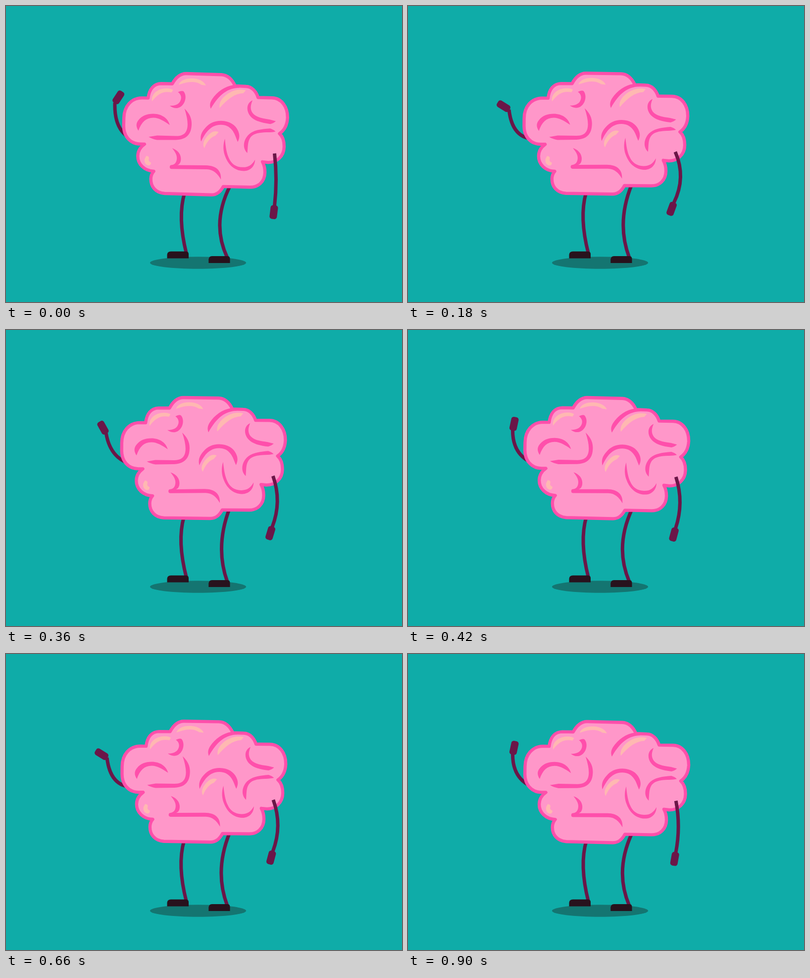
An HTML page that plays this animation: 800 by 600 pixels, repeating every 930 ms.

```html
<!DOCTYPE html>
<html lang="en">
<head>
<meta charset="utf-8">
<title>Waving brain</title>
<style>
  html, body { margin: 0; width: 100%; height: 100%; overflow: hidden; background: #0facA8; }
  svg { display: block; width: 100%; height: 100%; }
  .limb { fill: none; stroke: #6b1648; stroke-width: 7; }
  .hand { fill: #6b1648; }
  .shoe { fill: #28121d; }
  .skin { fill: #ff97c9; stroke: #ff4fab; stroke-width: 6.4; stroke-linejoin: round; }
  .fold { fill: #ff4fab; }
  .shine { fill: #ffb8b2; }
</style>
</head>
<body>
<svg viewBox="0 0 800 600">
  <ellipse cx="388" cy="520.5" rx="97" ry="12.3" fill="#147571"/>
  <path id="legL" class="limb"/>
  <path id="legR" class="limb"/>
  <path class="shoe" d="M325.5 511.5V504Q326 497.500 333 497.500H363Q369 497.500 369 503V511.500Z"/>
  <path class="shoe" d="M409.300 521V513.500Q410 507 416.500 507H447Q452.500 507 452.500 512.500V521Z"/>
  <path id="armL" class="limb"/>
  <rect id="handL" class="hand" x="-7.5" y="-14" width="15" height="28" rx="5"/>
  <g id="brain">
    <path class="skin" d="M328 158.500C335 145 344 137 356 137L427 137.500C440 138 449 147 455 159.500L477 160C489 160 498 170 502 182H530C550 182 562.500 200 562.500 222C562 236 557 247 547 254C554 260 557 271 557 281C557 300 543 313 525 313L514 312C518 319 519.500 326 519.500 334C519.500 352 507 364 490 364H436C431 374 424 381.500 412 381.500L318 381C300 380 289.500 368 289.500 352C289.500 346 291 341 295 336.500C276 336 262 323 262 306C262 297 267 288 275 282H266C245 282 232 266 232 245V230C232 206 246 189 268 188.500H280C282 170 291 159 306 158.500Z"/>
    <g class="fold">
      <path d="M340 175Q347 171 351 173C356 178 357 188 353 196C347 208 335 211 324 203C334 203 342 200 345 193C348 187 347 180 340 175Z"/>
      <path d="M262 255C256 246 257 239 262 233C269 224 279 220 292 220C308 220 321 228 325 242C313 234 303 228 292 228C277 228 268 237 262 255Z"/>
      <path d="M354 208C366 219 370 230 369 243C368 262 357 271 338 272L300 273Q290 271 283 267L300 264H338C354 264 361 256 361 241Q361 228 354 208Z"/>
      <path d="M407 207C403 197 407 190 413 182C425 167 441 158 458 157L464 163C441 164 424 176 407 207Z"/>
      <path d="M491 188C480 193 478 206 485 217C493 229 509 233 528 235Q535 233 539 229L527 226C511 224 499 222 492 214C486 206 487 198 491 188Z"/>
      <path d="M483 295C474 287 474 274 480 264C488 250 504 246 528 244Q535 246 539 250Q532 252 520 252C503 253 492 256 487 266C483 274 484 283 483 295Z"/>
      <path d="M389 274C386 262 390 254 397 246C405 236 416 231 429 231C446 231 458 239 463 250C467 258 467 265 463 273C459 264 457 256 451 249C445 242 438 239 429 239C411 239 399 251 389 274Z"/>
      <path d="M437 267C433 280 434 293 439 304C446 321 459 331 475 331.500C489 332 499 322 499 308C493 319 486 324 474 324C460 324 451 317 446 306C441 296 439 284 437 267Z"/>
      <path d="M331 289C341 292 348 299 349 308C350 316 347 322 342 323L400 322C421 322 432 332 431 350C424 338 415 330 402 330L331 331A4 4 0 0 1 331 323C338 322 341 316 341 309C341 303 338 297 331 289Z"/>
    </g>
    <g class="shine">
      <path d="M341 160C344 151 355 146.500 368 146.500C380 146.500 392 151 396 160L387 159C378 153 368 153 357 155Q349 157 341 160Z"/>
      <path d="M288 195C285 180 300 168 317 168Q326 168 330 171L327 176C312 173 300 178 288 195Z"/>
      <path d="M425 205C422 192 433 180 445 173C457 166 468 166 477 168L472 174C455 175 441 186 425 205Z"/>
      <path d="M396 287C390 278 397 266 406 258C412 253 417 251 424 254L418 261C408 265 401 274 396 287Z"/>
      <path d="M279 306C284 305 286 310 284 313Q284 317 289 319Q289 325 284 325C278 324 275 319 276 312Z"/>
    </g>
  </g>
  <path id="armR" class="limb"/>
  <rect id="handR" class="hand" x="-7.5" y="-14" width="15" height="28" rx="5"/>
</svg>
<script>
const LOOP = 930, STEP = 30, RAD = Math.PI / 180;
const PIVOT = [360, 480];

// Body sway: time, lean in degrees, lift
const sway = { period: 480, keys: [
  [0, 1.4, 0], [60, 1.3, 0], [180, 0.6, -0.8], [300, 0, 0], [420, 1.02, 0]
] };
// Waving arm: time, control x/y, wrist x/y, hand tilt
const wave = { period: 480, keys: [
  [0, 218, 250, 220, 196, 33],
  [60, 215, 250, 218, 199, 8],
  [180, 210, 264, 204, 210, -58],
  [300, 210, 262, 196, 213.5, -63],
  [420, 211, 251, 211.5, 203, 12]
] };
// Hanging arm: time, wrist x/y, bulge, hand tilt
const hang = { period: 960, keys: [
  [0, 542.5, 405, 3, 7],
  [180, 537, 399, 12, 20],
  [300, 535.5, 397, 11, 19],
  [420, 540.5, 402, 8.5, 15],
  [540, 541.5, 402.5, 11, 17],
  [780, 537, 398.5, 7.5, 12],
  [900, 541, 402.5, 5, 10]
] };

// Smooth cyclic interpolation through the keys
function sample({ period, keys }, time) {
  const t = time % period, n = keys.length;
  const key = i => {
    const turn = Math.floor(i / n), k = keys[i - turn * n];
    return [k[0] + turn * period, ...k.slice(1)];
  };
  let i = n - 1;
  while (keys[i][0] > t) i--;
  const [a, b, c, d] = [-1, 0, 1, 2].map(o => key(i + o));
  const span = c[0] - b[0], u = (t - b[0]) / span;
  return b.slice(1).map((p, j) => {
    j++;
    const m0 = (c[j] - a[j]) / (c[0] - a[0]) * span;
    const m1 = (d[j] - b[j]) / (d[0] - b[0]) * span;
    const diff = c[j] - p;
    return p + u * (m0 + u * (3 * diff - 2 * m0 - m1 + u * (m0 + m1 - 2 * diff)));
  });
}

const el = id => document.getElementById(id);
const parts = Object.fromEntries(
  ["brain", "legL", "legR", "armL", "armR", "handL", "handR"].map(id => [id, el(id)]));

const curve = (part, from, ctrl, to) =>
  part.setAttribute("d", `M${from}Q${ctrl} ${to}`);
const place = (part, x, y, deg) =>
  part.setAttribute("transform", `translate(${x} ${y}) rotate(${deg})`);

function draw(t) {
  const [lean, lift] = sample(sway, t);
  const cos = Math.cos(lean * RAD), sin = Math.sin(lean * RAD);
  const attach = (x, y) => {
    const dx = x - PIVOT[0], dy = y - PIVOT[1];
    return [PIVOT[0] + dx * cos - dy * sin, PIVOT[1] + dx * sin + dy * cos + lift];
  };
  parts.brain.setAttribute("transform", `translate(0 ${lift}) rotate(${lean} ${PIVOT})`);

  const bend = lean / 1.4;
  curve(parts.legL, [359 + 2 * bend, 378], [345 + bend, 428], [364.5, 502]);
  curve(parts.legR, [450.5 + 2.5 * bend, 362 + 2 * bend], [425.5 - 11.5 * bend, 440], [447, 510]);

  const [cx, cy, wx, wy, tilt] = sample(wave, t);
  curve(parts.armL, attach(246, 271), [cx, cy], [wx, wy]);
  place(parts.handL, wx + 13 * Math.sin(tilt * RAD), wy - 13 * Math.cos(tilt * RAD), tilt);

  const [hx, hy, bulge, turn] = sample(hang, t);
  const shoulder = attach(538, 294.5);
  curve(parts.armR, shoulder,
    [(shoulder[0] + hx) / 2 + 2 * bulge, (shoulder[1] + hy) / 2], [hx, hy]);
  place(parts.handR, hx - 13 * Math.sin(turn * RAD), hy + 13 * Math.cos(turn * RAD), turn);
}

const start = performance.now();
function tick() {
  const t = (performance.now() - start) % LOOP;
  draw(Math.floor(t / STEP) * STEP);
  requestAnimationFrame(tick);
}
tick();
</script>
</body>
</html>
```
